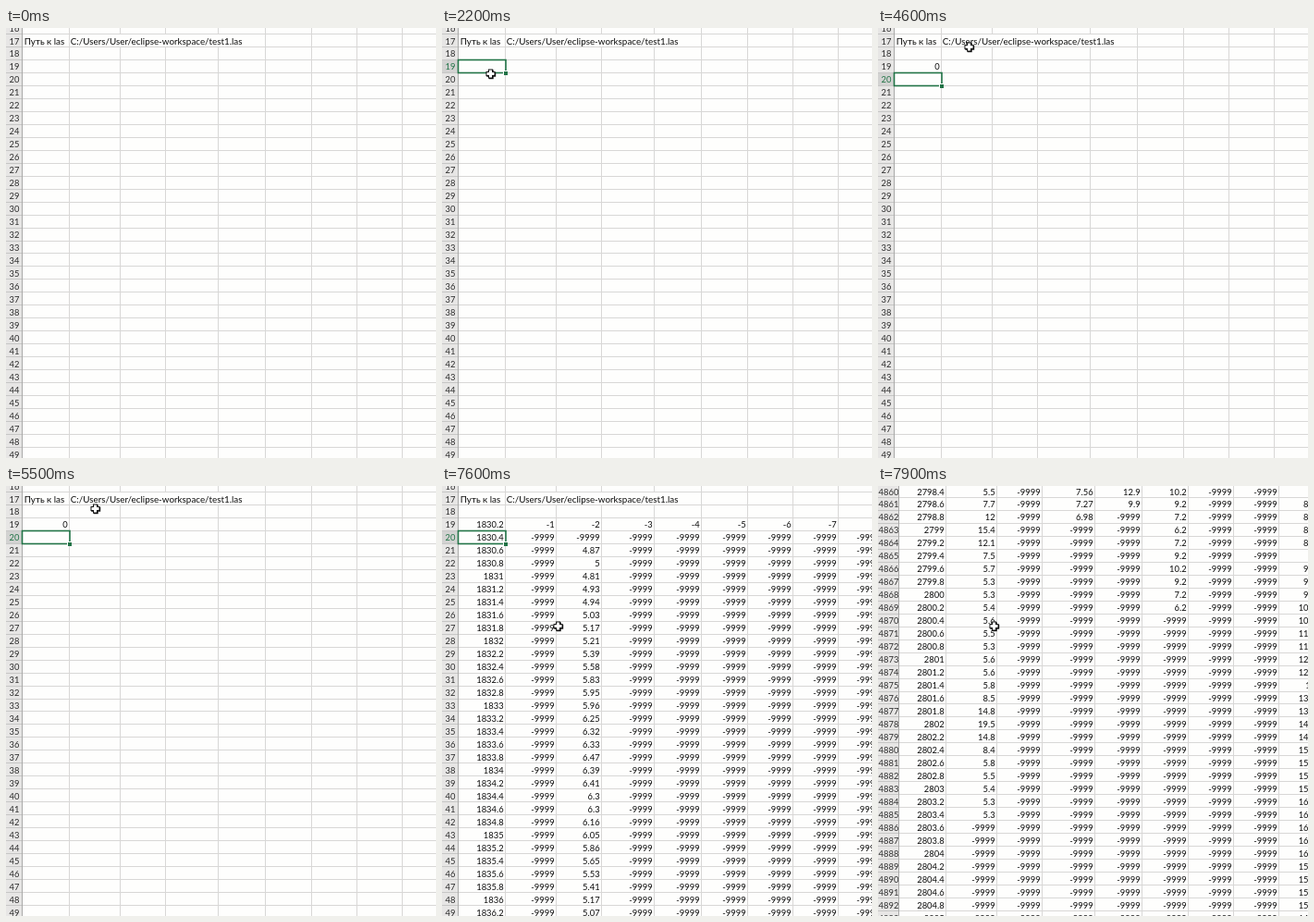
These frames come from a looping animation (465x465 px, 8 s). An HTML page with a canvas:

```html
<!DOCTYPE html>
<html lang="ru">
<head>
<meta charset="utf-8">
<style>
  html, body { margin: 0; width: 100%; height: 100%; overflow: hidden; background: #fefefd; }
  canvas { display: block; }
</style>
</head>
<body>
<canvas id="stage" width="465" height="465"></canvas>
<script>
const SIZE = 465, LOOP = 8000, ROW = 13.97;
const GREEN = '#217346', BLUE = '#4a7ab8', INK = '#0c0c0c', PAPER = '#fefefd', GRID = '#d8d7d6';
const TEXT_FONT = '9.85px Lato, "Open Sans", sans-serif';
const DIGIT_FONT = '9.4px Lato, "Open Sans", sans-serif';
const ctx = document.getElementById('stage').getContext('2d');

const EDGES = [17, 68, 123, 172, 229, 280, 330, 379, 428, 475];
const PATH = 'C:/Users/User/eclipse-workspace/test1.las';
const FORMULA = '=context_las_curves_matrix(';

const CLICK = 1700, TYPE_START = 2500, TYPE_END = 3400, PICK = 3700;
const CLOSE = 4100, ENTER = 4400, FILLED = 5800, SCROLL = 7800, DEEP = 7900;

// Pointer moves: start, end, from, to.
const MOVES = [
  { start: 700, end: 1500, from: [264, -8], to: [52, 49] },
  { start: 3000, end: 3500, from: [52, 49], to: [98, 20] },
  { start: 4500, end: 5000, from: [98, 20], to: [96, 24] },
  { start: 5600, end: 6100, from: [96, 24], to: [114, 53] },
  { start: 6400, end: 6900, from: [114, 53], to: [125, 151] }
];

function pointerAt(t) {
  const move = MOVES.findLast(m => t >= m.start);
  if (!move) return null;
  const u = Math.min(1, (t - move.start) / (move.end - move.start));
  const k = u * u * (3 - 2 * u);
  return move.from.map((a, i) => a + (move.to[i] - a) * k);
}

function noise(seed) {
  const n = Math.sin(seed * 12.9898) * 43758.5453;
  return n - Math.floor(n) - 0.5;
}

const peak = (k, center, height) => height * Math.exp(-(((k - center) / 1.6) ** 2));

// Logged stretches of each column; k counts rows from the first one.
const CURVES = [
  { col: 2, first: 21, count: 80, digits: 2, value: k => 5.65 - 0.75 * Math.cos((k - 2) * 0.21) + 0.2 * noise(k) },
  { col: 1, first: 2400, count: 2460, digits: 1, value: k => 7 + 2 * Math.sin(k * 0.3) + noise(k) },
  { col: 1, first: 4860, count: 26, digits: 1, value: k => 5.4 + peak(k, 3, 10) + peak(k, 18, 14) + noise(k) * 0.4 },
  { col: 3, first: 4860, count: 3, digits: 2, value: k => 7.56 - 0.29 * k },
  { col: 4, first: 4860, count: 2, digits: 1, value: k => 12.9 - 3 * k },
  { col: 5, first: 4860, count: 10, digits: 1, value: k => 8.2 + 2 * Math.cos(k * 1.05) },
  { col: 8, first: 4860, count: 40, digits: 1, value: k => 125.2 - 37 * Math.cos((k - 2) * 0.131) + noise(k) }
];

function cellValue(row, col) {
  if (col === 0) return String(+(1830.2 + (row - 19) * 0.2).toFixed(1));
  if (row === 19) return String(-col);
  const curve = CURVES.find(c => c.col === col && row >= c.first && row < c.first + c.count);
  return curve ? String(+curve.value(row - curve.first).toFixed(curve.digits)) : '-9999';
}

function viewAt(t) {
  if (t >= DEEP) return { first: 4860, top: -1, shift: 5 };
  if (t >= SCROLL) return { first: 2440, top: -1, shift: 5 };
  return { first: 16, top: 7 - ROW, shift: 0 };
}

function write(text, x, y, align = 'left', color = INK, font = DIGIT_FONT) {
  ctx.font = font;
  ctx.textAlign = align;
  ctx.fillStyle = color;
  ctx.fillText(text, x, y);
}

function fill(color, x, y, w, h) {
  ctx.fillStyle = color;
  ctx.fillRect(x, y, w, h);
}

function drawSheet({ first, top, shift }, selected, filled) {
  const head = EDGES[0] + shift;
  const rowTop = row => Math.round(top + (row - first) * ROW);
  fill(PAPER, 0, 0, SIZE, SIZE);
  fill('#e7e6e5', 0, 0, head, SIZE);
  for (const edge of EDGES.slice(1)) fill(GRID, edge + shift, 0, 1, SIZE);

  for (let row = first; rowTop(row) < SIZE; row++) {
    const y = rowTop(row), h = rowTop(row + 1) - y;
    const baseline = top + (row - first) * ROW + 10.5;
    const active = row === selected;
    fill(GRID, head, y + h - 1, SIZE, 1);
    if (active) fill('#d2d2d1', 0, y, head, h);
    fill('#c6c6c5', 0, y + h - 1, head, 1);
    write(row, head / 2 + 0.5, baseline, 'center', active ? GREEN : '#2c2c2c');
    if (row === 17) {
      fill(PAPER, EDGES[1] + 1, y, EDGES[4] - EDGES[1] + 50, h - 1);
      write('Путь к las', 19.7, baseline, 'left', INK, TEXT_FONT);
      write(PATH, 69.7, baseline, 'left', INK, TEXT_FONT);
    }
    if (filled && row >= 19) {
      for (let col = 0; col < EDGES.length - 1; col++) {
        write(cellValue(row, col), EDGES[col + 1] + shift - 1.4, baseline, 'right');
      }
    }
  }
  fill('#a9a9a8', head, 0, 1, SIZE);
}

function drawSelection(row) {
  const y = Math.round(7 + (row - 17) * ROW) - 1;
  ctx.strokeStyle = GREEN;
  ctx.lineWidth = 1.6;
  ctx.strokeRect(17.5, y + 0.5, 51.5, 14);
  fill(PAPER, 66, y + 12, 5, 5);
  fill(GREEN, 67, y + 13, 4, 4);
}

function drawEditor(t) {
  const progress = Math.min(1, (t - TYPE_START) / (TYPE_END - TYPE_START));
  const parts = [
    [FORMULA.slice(0, Math.ceil(progress * FORMULA.length)), INK],
    [t >= PICK ? 'B17' : '', BLUE],
    [t >= CLOSE ? ')' : '', INK]
  ];
  ctx.font = TEXT_FONT;
  const end = 19.7 + ctx.measureText(parts.map(part => part[0]).join('')).width;
  fill(PAPER, 18, 35, Math.max(51, end - 16), 13);
  fill(GREEN, 17, 34, 1.5, 15);
  fill(GREEN, 17, 34, 52, 1);
  fill(GREEN, 17, 48, 53, 1.5);
  if (end < 66) fill(GREEN, 68, 34, 1.5, 15);
  let x = 19.7;
  for (const [text, color] of parts) {
    write(text, x, 45.4, 'left', color, TEXT_FONT);
    x += ctx.measureText(text).width;
  }
  fill(INK, Math.round(end), 37, 1, 11);
}

function drawPickedCell(t) {
  ctx.lineWidth = 1.8;
  ctx.strokeStyle = BLUE;
  ctx.strokeRect(69, 7, 55, 13.5);
  ctx.strokeStyle = GREEN;
  ctx.setLineDash([4, 3]);
  ctx.lineDashOffset = -t / 50;
  ctx.strokeRect(69, 7, 55, 13.5);
  ctx.setLineDash([]);
  for (const x of [67, 122]) for (const y of [5, 19]) fill(BLUE, x, y, 3, 3);
}

function drawPointer(position) {
  const [x, y] = position.map(v => Math.round(v) + 0.5);
  const cross = (r, w, color, d = 0) => {
    fill(color, x - r + d, y - w + d, 2 * r, 2 * w);
    fill(color, x - w + d, y - r + d, 2 * w, 2 * r);
  };
  cross(5, 2.5, '#111', 0.7);
  cross(5, 2.5, '#111');
  cross(4, 1.5, '#fff');
}

function draw(t) {
  const selected = t < CLICK ? 0 : t < ENTER ? 19 : 20;
  const editing = t >= TYPE_START && t < ENTER;
  drawSheet(viewAt(t), selected, t >= FILLED);
  if (t >= ENTER && t < FILLED) write('0', 66.6, 45.4, 'right');
  if (editing) drawEditor(t);
  else if (selected && t < SCROLL) drawSelection(selected);
  if (t >= PICK && t < ENTER) drawPickedCell(t);
  const pointer = pointerAt(t);
  if (pointer) drawPointer(pointer);
}

function tick() {
  draw(performance.now() % LOOP);
  requestAnimationFrame(tick);
}
tick();
</script>
</body>
</html>
```
